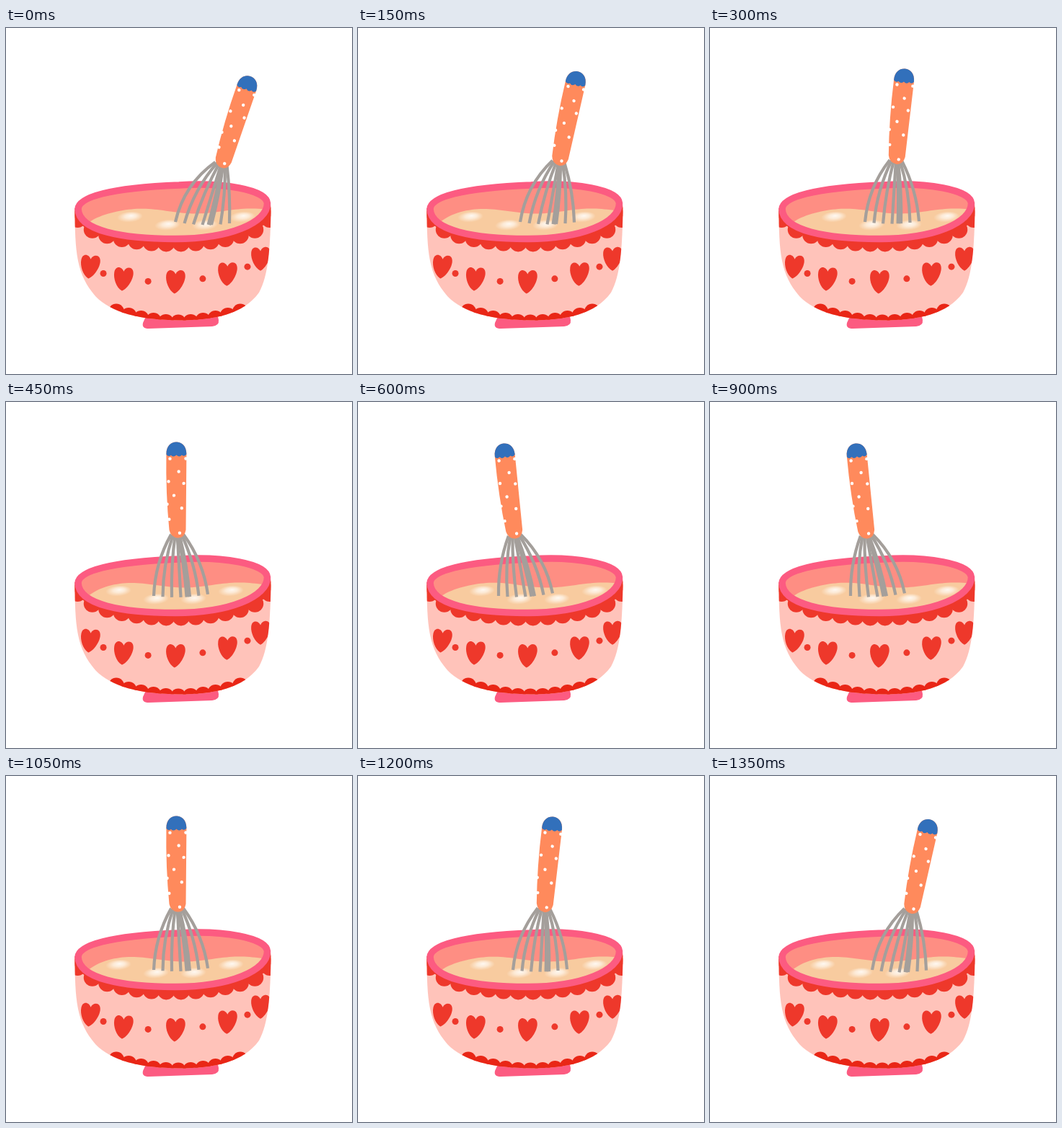
These frames come from a looping animation (480 by 480 pixels, 1.5 s). An HTML page with a canvas:

```html
<!DOCTYPE html>
<html lang="en">
<head>
<meta charset="utf-8">
<title>Mixing bowl</title>
<style>
html, body { margin: 0; width: 100%; height: 100%; overflow: hidden; background: #fff; }
canvas { display: block; }
</style>
</head>
<body>
<canvas id="stage" width="480" height="480"></canvas>
<script>
const ctx = document.getElementById('stage').getContext('2d');
const PINK = '#fc5b81', RED = '#ee382b', DEEP_RED = '#e92616', SKIN = '#ffc3ba', WALL = '#fe8e83',
      BATTER = '#f8cb9f', WIRE = '#a49f9b', ORANGE = '#ff8a5c', BLUE = '#3270bb';
const DEG = Math.PI / 180;

const foot = new Path2D('M195 398L190 409Q188 417 198 417L286 414Q296 413 295 405L293 396Z');
const body = new Path2D('M95.5 250C95.5 312 98 342 124 372C146 395 185 405 240 405.5C290 405.5 329 397 351 367C364 343 367 305 367.5 245Z');
const rim = new Path2D('M100 251C101 235 140 222 240 218C300 214 361 224 362.5 243C363 270 310 292.5 235 292.5C160 292.5 101 281 100 251Z');
const heart = new Path2D('M-1 17C-9 13-14 0-13-8C-12-18-3-17 0-10C3-18 14-18 13.5-7C13 3 5 15-1 17Z');
const grip = new Path2D('M-14-115C-14-126-7-131 0-131S14-126 14-115L12-9Q10 2 1 2Q-9 1-11-9Q-15.5-60-14-115Z');
const cap = new Path2D('M-14-114C-14-126-7-131 0-131S14-126 14-114Q11-110 7.5-113Q4-109 0-113Q-4-109-7.5-113Q-11-110-14-114Z');

function fill(path, color) {
  ctx.fillStyle = color;
  ctx.fill(path);
}

function disc(x, y, r, color) {
  ctx.fillStyle = color;
  ctx.beginPath();
  ctx.arc(x, y, r, 0, 7);
  ctx.fill();
}

// Draw in a moved and turned space, then restore it
function placed(x, y, turn, draw) {
  ctx.save();
  ctx.translate(x, y);
  ctx.rotate(turn);
  draw();
  ctx.restore();
}

function clipped(path, draw) {
  ctx.save();
  ctx.clip(path);
  draw();
  ctx.restore();
}

// Hearts and beads alternate around the curved side
function drawPattern() {
  for (let i = -4; i <= 4; i++) {
    const around = i * 17.5 * DEG;
    const dx = 126 * Math.sin(around);
    const x = 235 + dx, y = 351.5 - 40 * (1 - Math.cos(around)) - .047 * dx;
    if (i % 2) disc(x, y, 4.5, RED);
    else placed(x, y, .03 - .05 * around, () => fill(heart, RED));
  }
}

function drawScallops() {
  ctx.fillStyle = RED;
  ctx.beginPath();
  ctx.ellipse(231, 255, 138, 46, 0, 0, 7);
  ctx.fill();
  for (let i = -6.5; i <= 6.5; i++) {
    const u = i * 20.5 / 137;
    disc(232.5 + i * 20.5, 255 + 43.5 * Math.sqrt(1 - u * u), 12, RED);
  }
  for (let i = -5; i <= 5; i++) disc(239 + i * 17.2, 408.5 - .6 * i * i, 11, DEEP_RED);
}

function drawBowl() {
  fill(foot, PINK);
  fill(body, SKIN);
  clipped(body, () => {
    drawPattern();
    drawScallops();
  });
}

function drawShine(x, y) {
  placed(x, y, -.08, () => {
    ctx.scale(18, 7.5);
    const glow = ctx.createRadialGradient(.1, -.2, 0, 0, 0, 1);
    glow.addColorStop(0, 'rgba(255,253,250,.9)');
    glow.addColorStop(.45, 'rgba(255,250,243,.65)');
    glow.addColorStop(1, 'rgba(255,245,232,0)');
    disc(0, 0, 1, glow);
  });
}

// The batter sloshes from side to side with each step
function drawBatter(step) {
  const slosh = step % 2 ? -8 : 8;
  const surface = new Path2D('M110 300');
  for (let x = 114; x <= 370; x += 4) {
    surface.lineTo(x, 254 - 3.5 * Math.cos((x - 178 - slosh) / 24.5) + 13 * Math.exp((114 - x) / 18));
  }
  surface.lineTo(370, 300);
  fill(rim, WALL);
  clipped(rim, () => {
    fill(surface, BATTER);
    ctx.clip(surface);
    for (let k = 0; k < 4; k++) {
      drawShine(164 + 52 * k + slosh, 262 + 13 * Math.sin(k * Math.PI / 3));
    }
  });
  ctx.strokeStyle = PINK;
  ctx.lineWidth = 9.5;
  ctx.stroke(rim);
}

function drawWhisk(step) {
  const tilt = 18 - 6.2 * step;
  const baseX = 298.5 - 20.3 * step, baseY = 186.5 + .7 * (step - 2.7) ** 2;
  const cos = Math.cos(tilt * DEG), sin = Math.sin(tilt * DEG);

  // side runs from -1 (left wire) to 1 (right wire)
  function wire(side, width) {
    const x0 = baseX + side * 8.5 * cos, y0 = baseY - 3 + side * 8.5 * sin;
    const x1 = 272.5 - 10 * step + side * 37.5;
    const y1 = 273 - .7 * step * (1 + side) - 3 * side * side + side;
    const dx = x1 - x0, dy = y1 - y0;
    const bulge = side * (11 - side * tilt * .45) / Math.hypot(dx, dy);
    ctx.lineWidth = width;
    ctx.beginPath();
    ctx.moveTo(x0, y0);
    ctx.quadraticCurveTo(x0 + dx / 2 + dy * bulge, y0 + dy / 2 - dx * bulge, x1, y1);
    ctx.stroke();
  }

  ctx.strokeStyle = WIRE;
  for (let i = -3; i <= 3; i++) wire(i / 3, 4.2);
  wire(.24, 6);

  placed(baseX, baseY, tilt * DEG, () => {
    fill(grip, ORANGE);
    // Three slanting columns of dots
    for (let i = 0; i < 4; i++) {
      disc(13 - 3.2 * i, -108 + 34.4 * i, 2.2, '#fff');
      if (i === 3) break;
      disc(3 - 7 * i, -90 + 33 * i, 2.2, '#fff');
      disc(-9 - 2.3 * i, -108 + 31.5 * i, 2.2, '#fff');
    }
    fill(cap, BLUE);
  });
}

// Ten beats of 150 ms: the whisk takes five steps left and five back
function frame() {
  const beat = Math.floor(performance.now() % 1500 / 150);
  const step = 5 - Math.abs(5 - beat);
  ctx.fillStyle = '#fff';
  ctx.fillRect(0, 0, 480, 480);
  drawBowl();
  drawBatter(step);
  drawWhisk(step);
  requestAnimationFrame(frame);
}
frame();
</script>
</body>
</html>
```
